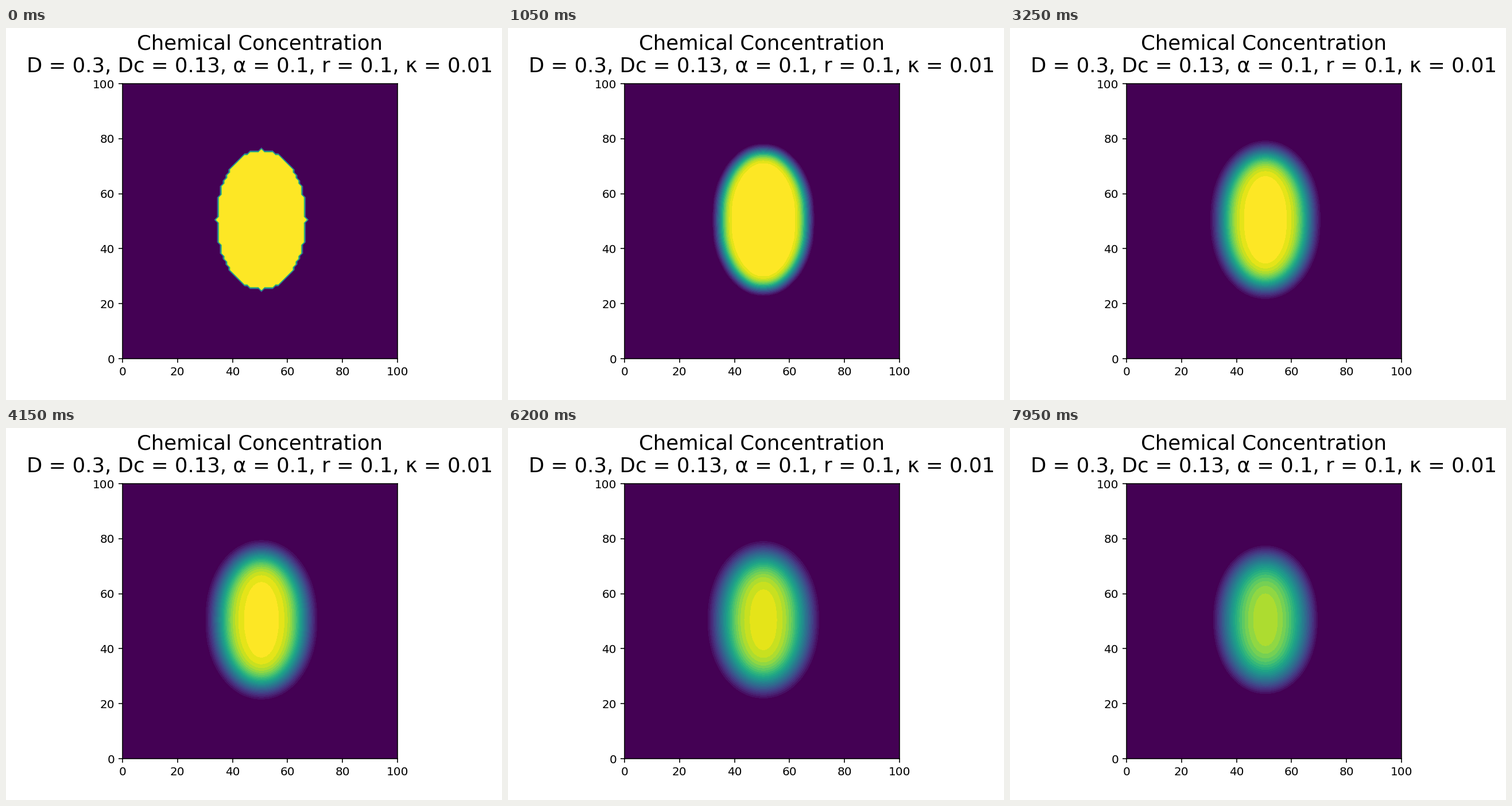
Recreate the animation shown at these times as a matplotlib script. Size 864 by 648 pixels, loop 8 s.

```python
import numpy as np
import matplotlib.pyplot as plt
from matplotlib.animation import FuncAnimation

W, H = 864, 648
N, FRAMES, STEPS = 100, 160, 4
DC = 0.13                       # spread of the chemical per frame
BANDS = 25

levels = np.linspace(0, 1, BANDS + 1)
first, last = levels[1] / 2, 1 - levels[1] / 2
levels[0] = -1                  # lowest band also takes the depleted outside


def diffuse(u):
    p = np.pad(u, 1, mode="edge")
    lap = p[2:, 1:-1] + p[:-2, 1:-1] + p[1:-1, 2:] + p[1:-1, :-2] - 4 * u
    return u + DC / STEPS * lap


def simulate():
    """Chemical left in an elliptic patch that spreads and is used up."""
    j, i = np.mgrid[:N, :N] - N // 2
    gap = ((i / 16) ** 2 + (j / 25) ** 2 > 1).astype(float)
    fields = []
    for t in range(FRAMES):
        early = 0.12 * (1 - np.exp(-t / 10))
        late = 0.0022 * (np.exp(0.0243 * t) - 1)
        fields.append(1 - (1 + early) * gap - late * (1 + gap))
        for _ in range(STEPS):
            gap = diffuse(gap)
    return fields


fields = simulate()
grid = np.linspace(0, 100, N)

fig = plt.figure(figsize=(W / 144, H / 144), dpi=144)
ax = fig.add_axes([203 / W, 72 / H, 479 / W, 479 / H])
ax.set_title("Chemical Concentration\n"
             "D = 0.3, Dc = 0.13, α = 0.1, r = 0.1, κ = 0.01",
             fontsize=17.75, pad=10.2)
layer = None


def draw(k):
    global layer
    if layer is not None:
        layer.remove()
    layer = ax.contourf(grid, grid, fields[k], levels, cmap="viridis",
                        vmin=first, vmax=last)
    return layer,


anim = FuncAnimation(fig, draw, frames=FRAMES, interval=50, repeat=True,
                     repeat_delay=0, blit=False)
plt.show()
```
